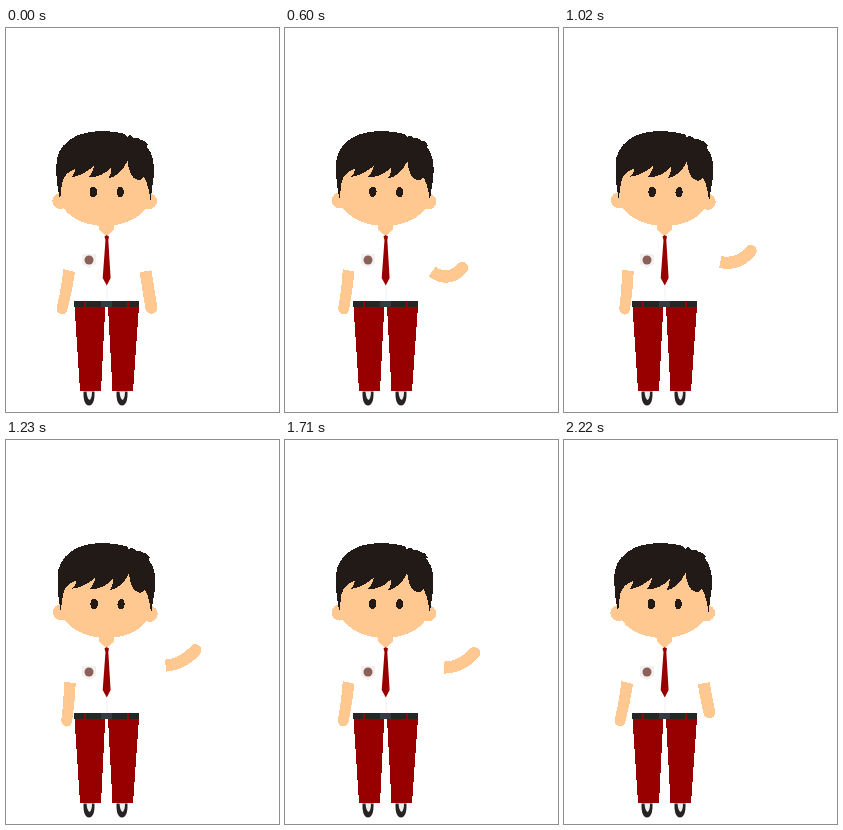
These frames come from a looping animation (273x384 px, 2.25 s). An HTML page:

```html
<!DOCTYPE html>
<html lang="en">
<head>
<meta charset="utf-8">
<title>Waving schoolboy</title>
<style>
  html, body { margin: 0; width: 100%; height: 100%; overflow: hidden; background: #fff; }
  svg { display: block; width: 100vw; height: 100vh; }
  .skin { fill: #ffc891; }
  .arm { fill: none; stroke: #ffc891; stroke-width: 12; }
  .red { fill: #980000; }
  .dark { fill: #211a16; }
  .crisp { shape-rendering: crispEdges; }
</style>
</head>
<body>
<svg viewBox="0 0 273 384">
  <defs>
    <g id="shoe">
      <path d="M-5.500 0 H5.500 Q6 13.500 0 14 Q-6 13.500 -5.500 0Z" fill="#272223"/>
      <path d="M-2.500 0 H3 Q3 7 .5 8.500 Q-2 7 -2.500 0Z" fill="#eee"/>
    </g>
  </defs>

  <!-- legs -->
  <use href="#shoe" x="83" y="363.500"/>
  <use href="#shoe" x="116" y="363.500"/>
  <g class="red crisp">
    <path d="M68.500 278 H99.300 L95 363 H74Z"/>
    <path d="M102 278 H133 L127 363 H106.500Z"/>
  </g>
  <path class="crisp" d="M68 272.500 H133 V279 H68Z" fill="#262528"/>
  <path class="red" d="M78 273 h2 v6 h-2Z M121 273 h2 v6 h-2Z"/>
  <rect x="95" y="273" width="11" height="6" fill="#353b42"/>
  <path d="M101 258 V272" stroke="#f0f0f0" fill="none"/>

  <!-- arms -->
  <path id="left" class="skin crisp" d="M57.500 241 L69 244 Q66 264 61.500 281 Q60 287 55 286 Q50 285 51 278 Q55 262 57.500 241Z"/>
  <path id="right" class="arm crisp"/>
  <circle id="hand" class="skin crisp" r="6"/>

  <!-- shirt details -->
  <path d="M76 226 H90 V236 L83 240 L76 236Z" fill="#f3f1f0"/>
  <circle cx="83" cy="232" r="4.500" fill="#8a6058"/>
  <path class="skin" d="M93 195 H108 V201.500 L102 207 H99 L93 201.500Z"/>
  <path class="red" d="M98.500 208.500 L100.500 207 L103 208.500 L102.300 212 L104.600 250 L100.800 257.500 L96.700 250 L99.500 212Z"/>

  <g id="head">
    <g class="skin crisp">
      <circle cx="54.300" cy="173" r="8"/>
      <circle cx="143" cy="173" r="8"/>
      <path d="M53 145 Q53 120 99 120 Q145 120 145 150 V168 C142 187 121 198 99 198 C77 198 55 187 53 168Z"/>
    </g>
    <path class="dark crisp" d="M54 172 C51 158 49 143 51 130 C53 121 60 113 70 108
      C81 103 102 101 119 106 L121 109 L124 107 L128 110 L132 110 L135 112 L139 113 L142 117 L140.500 118
      C148 127 148.500 137 147.500 150 L144.500 172 C143 163 142 156 138 149 Q135 153 131 151.500
      C125 150 123 143 121.500 133 Q114.500 148 102 150.500 Q106 146 105.500 139 Q96.500 149.500 82 149.500 Q87 145 88 138
      Q76 148 65 149.500 Q69 146 69 141 Q58 145 56 155Z"/>
    <g class="dark crisp">
      <ellipse cx="87.300" cy="164" rx="3.800" ry="5.300"/>
      <ellipse cx="114.200" cy="164" rx="3.600" ry="5.300"/>
    </g>
  </g>
</svg>
<script>
  const LOOP = 2250, STEP = 30, PEAK = 1410;
  const SHOULDER = [133, 217];

  const get = id => document.getElementById(id);
  const [left, right, hand, head] = ['left', 'right', 'hand', 'head'].map(get);

  function smooth(u) {
    u = Math.min(Math.max(u, 0), 1);
    return u * u * (3 - 2 * u);
  }

  // Point at a distance and an angle in degrees, with 0 hanging straight down
  function reach([x, y], deg, len) {
    const a = deg * Math.PI / 180;
    return [x + len * Math.sin(a), y + len * Math.cos(a)];
  }

  function drawArm(t) {
    const lift = t < PEAK ? (t / PEAK) ** 2 : smooth((LOOP - t) / (LOOP - PEAK));
    const fold = smooth((t - 100) / 560) * smooth((LOOP - t) / 350);
    const upper = 14 + 76 * lift;
    const fore = upper - 5 + fold * (85 - 45 * lift);
    const length = 29.5 + 5.5 * lift + 7.5 * Math.max(0, 1 - t / 180);
    const sag = 16 * fold * (1 - 0.75 * lift);

    const sleeve = reach(SHOULDER, upper, 27 + 4 * fold * (1 - lift));
    const elbow = reach(reach(sleeve, fore, length / 2), fore - 90, sag);
    const tip = reach(sleeve, fore, length);
    right.setAttribute('d', `M${sleeve} Q${elbow} ${tip}`);
    hand.setAttribute('transform', `translate(${tip})`);
  }

  function draw(t) {
    drawArm(t);
    const sway = (1 - Math.cos(2 * Math.PI * t / LOOP)) / 2;
    head.setAttribute('transform', `rotate(${1.2 * sway} 100 205)`);
    left.setAttribute('transform', `rotate(${-6 * sway} 63 236)`);
  }

  function tick() {
    draw(Math.floor(performance.now() % LOOP / STEP) * STEP);
    requestAnimationFrame(tick);
  }
  tick();
</script>
</body>
</html>
```
